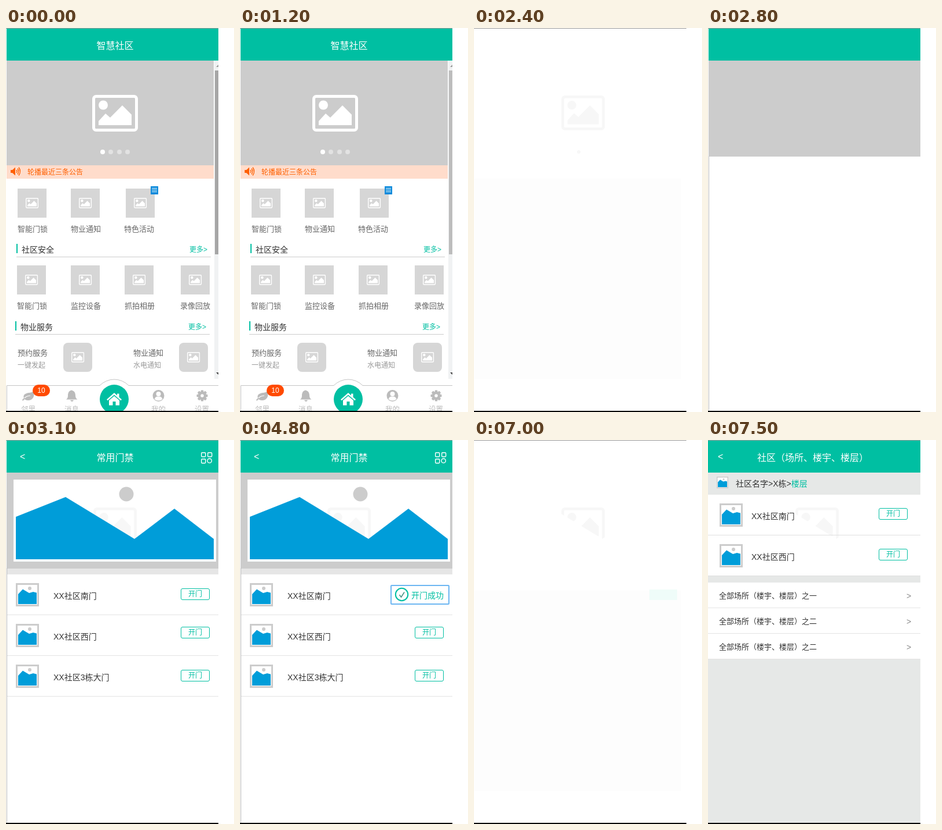
An HTML page that plays this animation: 394x660 px, repeating every 8 s.

```html
<!DOCTYPE html>
<html lang="zh-CN">
<head>
<meta charset="utf-8">
<title>智慧社区</title>
<style>
html, body { margin: 0; width: 100%; height: 100%; overflow: hidden; background: #fff; }
svg { display: block; width: 394px; height: 660px; }
text { font-family: "Liberation Sans", "Noto Sans CJK SC", "Noto Sans CJK", sans-serif; white-space: pre; }
</style>
</head>
<body>
<svg id="stage" viewBox="0 0 394 660" xmlns="http://www.w3.org/2000/svg"></svg>
<script>
const TEAL = '#00bfa2', BLUE = '#009dd9', GREY = '#ccc', TAB = '#bbb', LOOP = 8000;

const box = (x, y, w, h, fill, more = '') =>
  `<rect x="${x}" y="${y}" width="${w}" height="${h}" fill="${fill}" ${more}/>`;
const dot = (x, y, r, fill, more = '') =>
  `<circle cx="${x}" cy="${y}" r="${r}" fill="${fill}" ${more}/>`;
const path = (d, fill, more = '') => `<path d="${d}" fill="${fill}" ${more}/>`;
const line = (d, color, w = 1) => path(d, 'none', `stroke="${color}" stroke-width="${w}"`);
// y is the vertical middle of the characters
const label = (s, x, y, size, fill, anchor = 'start') =>
  `<text x="${x}" y="${y + size * 0.37}" font-size="${size}" fill="${fill}" text-anchor="${anchor}">${s}</text>`;
const group = (id, body, more = '') => `<g id="${id}" ${more}>${body}</g>`;

// Placeholder picture, 79 x 63 at scale 1
const picture = (x, y, k, color) => `<g transform="translate(${x} ${y}) scale(${k})">
  ${box(2.5, 2.5, 74, 58, 'none', `rx="4" stroke="${color}" stroke-width="5"`)}
  ${dot(19, 17.5, 8, color)}${path('M11 52V45L23 32L31 39L52 18L68 34V52Z', color)}</g>`;

const tile = (x, y, r = 0) => box(x, y, 50, 50, '#d6d6d6', `rx="${r}"`) + picture(x + 14, y + 16, 0.28, '#fff');

// Framed landscape, 40 x 40 at full size
const thumb = (x, y, size = 40) => `<g transform="translate(${x} ${y}) scale(${size / 40})">
  ${box(0, 0, 40, 40, GREY)}${box(3, 3, 34, 34, '#fff')}${dot(24, 9, 3, GREY)}
  ${path('M4 19L12 10.5L23 17L30 15L36 16.5V36H4Z', BLUE)}</g>`;

const button = (x, y) => box(x + .5, y + .5, 49, 19, '#fff', `rx="2.5" stroke="${TEAL}"`) +
  label('开门', x + 25, y + 10, 12, TEAL, 'middle');

const header = x => box(x, 1, 367 - x, 55, TEAL);

const slide = (active, color) => picture(149, 115, 1, color) +
  [167, 181, 196, 210].map((x, i) => dot(x, 213, 4, i === active ? '#fff' : '#e2e2e2')).join('');

const section = (name, x, y) => box(x, y - 10, 2, 16, TEAL) +
  label(name, x + 9, y, 14, '#333') + label('更多&gt;', x + 299, y, 12, TEAL) +
  box(x, y + 12, 336, 1, GREY);

const tiles = (list, y) => list.map(([name, x, tx]) =>
  tile(x, y) + label(name, tx, y + 69, 13, '#666')).join('');

const service = (name, note, x) => label(name, x, 558, 13, '#666') +
  label(note, x, 580, 12, '#999') + tile(x + 79, 541, 8);

function gear() {
  let teeth = '';
  for (let a = 0; a < 360; a += 45)
    teeth += box(336.7, 622.5, 4.6, 5, TAB, `rx="1" transform="rotate(${a} 339 632)"`);
  return teeth + dot(339, 632, 5, 'none', `stroke="${TAB}" stroke-width="4.5"`);
}

const speaker = path('M8 244H11L16 239.5V253.5L11 249H8Z', '#ff6000') +
  line('M18 244Q20 246.5 18 249M20 241.5Q23.5 246.5 20 251.5M22 239.5Q27 246.5 22 253.5', '#ff6000', 1.4);

const tabs = line('M1.5 658V614.5H162M212 614.5H367', '#c4c4c4') +
  path('M162 614.5A35 35 0 0 1 212 614.5', '#fff', 'stroke="#c4c4c4"') +
  dot(187, 638, 25, TEAL) +
  path('M174 638.5L187 627L192 631.5V628.5H195.5V634.5L200 638.5L198.3 640.2L187 630.5L175.7 640.2Z', '#fff') +
  path('M178 640L187 632.5L196 640V648.5H189.5V642H184.5V648.5H178Z', '#fff') +
  path('M48 624C50 634 46 640 38 640C35 640 34 639 32 638L29 641L28 639L31 636C28 628 39 627 43 626.5C45 626 46 625 48 624Z', TAB) +
  line('M32 636Q36 632 42 632', '#fff', 1.2) +
  path('M113 622.5C119 624 120 628 120 632Q120 636 123.5 638.5H104Q107 636 107 632C107 628 108 624 113 622.5ZM111 639.5H117Q116 642 114 642Q112 642 111 639.5Z', TAB) +
  dot(263.5, 632, 10, TAB) + dot(263.5, 629, 4, '#fff') +
  path('M256.5 638Q258 633.5 261 633.5H266Q269 633.5 270.5 638Q267 640.5 263.5 640.5Q260 640.5 256.5 638Z', '#fff') +
  gear() +
  [['邻里', 26], ['消息', 101], ['我的', 251], ['设置', 326]].map(([s, x]) => label(s, x, 655, 12.5, TAB)).join('') +
  box(46, 613, 30, 20, '#ff4a00', 'rx="10"') + label('10', 61, 623, 12, '#fff', 'middle');

const home = header(1) + label('智慧社区', 188.5, 30, 16, '#fff', 'middle') +
  box(1, 56, 358, 180, GREY) +
  `<g clip-path="url(#banner)">${group('slideA', slide(0, '#fff'))}${group('slideB', slide(1, '#f8f8f8'))}</g>` +
  box(1, 236, 358, 23, '#ffdccb') + speaker + label('轮播最近三条公告', 37, 248, 12, '#ff6000') +
  tiles([['智能门锁', 20, 20], ['物业通知', 112, 112], ['特色活动', 207, 204]], 276) +
  box(250, 272, 13, 14, '#0a8adb') + [275, 278, 281].map(y => box(252, y, 9, 1, '#fff')).join('') +
  section('社区安全', 18, 381) +
  tiles([['智能门锁', 19, 19], ['监控设备', 112, 112], ['抓拍相册', 205, 205], ['录像回放', 302, 301]], 408) +
  section('物业服务', 16, 514) +
  service('预约服务', '一键发起', 20) + service('物业通知', '水电通知', 220) +
  box(360, 56, 7, 547, '#f0f2f3') + box(361, 73, 6, 316, '#a6a6a6', 'id="bar"') +
  path('M363 67L367 63V67Z', '#999') + path('M363 592H367V596Z', '#444') + tabs;

const ridge = '17 132L103 98L222 170L291 118L359 170';
const ghost = picture(151, 116, 0.95, '#f7f7f7');
const cutGhost = `<g clip-path="url(#aboveRidge)">${ghost}</g>`;
const haze = box(1, 259, 357, 344, '#fdfdfd');

const doorFrame = header(1) + box(1, 56, 366, 165, GREY) + box(1, 220, 1, 438, '#bbb');

const doors = label('&lt;', 24, 28, 16, '#fff') + label('常用门禁', 188.5, 30, 16, '#fff', 'middle') +
  `<g stroke="#fff" stroke-width="1.4">${[[337, 21], [348, 21], [337, 32]].map(([x, y]) =>
    box(x + .7, y + .7, 7, 7, 'none', 'rx="1.2"')).join('')}${dot(351.7, 35.7, 3.7, 'none')}</g>` +
  box(13, 68, 350, 141, '#fff') + ghost + dot(208, 93, 12.5, GREY) +
  path(`M${ridge}V205H17Z`, BLUE) + box(2, 221, 365, 10, '#e6e6e6') +
  [['XX社区南门', 255], ['XX社区西门', 321], ['XX社区3栋大门', 395]].map(([s, by], i) =>
    thumb(17, 246 + 70 * i) + label(s, 82, 268 + 70 * i, 14, '#333') +
    button(302, by) + box(2, 300 + 70 * i, 365, 1, '#e4e4e4')).join('');

const toast = box(261, 250, 100, 32, '#fff', 'rx="1" stroke="#6db6f2" stroke-width="2"') +
  dot(279.5, 265.5, 10.7, '#fff', `stroke="${TEAL}" stroke-width="2"`) +
  line('M275.5 266L278.5 270L284 261.5', '#4d9487', 1.6) + label('开门成功', 296, 267, 14, TEAL);

const place = box(0, 56, 367, 602, '#e6e8e7') + header(0) +
  label('&lt;', 17, 28, 16, '#fff') + label('社区（场所、楼宇、楼层）', 85, 30, 16, '#fff') +
  thumb(15, 63, 20) +
  label(`社区名字&gt;X栋&gt;<tspan fill="${TEAL}">楼层</tspan>`, 48, 75, 14, '#333') +
  box(0, 94, 367, 139, '#fff') + cutGhost +
  ['南', '西'].map((s, i) => thumb(20, 109 + 70 * i) + label(`XX社区${s}门`, 75, 131 + 70 * i, 14, '#333') +
    button(295, 117 + 70 * i) + box(0, 163 + 70 * i, 367, 1, '#e0e0e0')).join('') +
  ['一', '二', '二'].map((s, i) => box(0, 245 + 44 * i, 367, 43, '#fff') +
    label(`全部场所（楼宇、楼层）之${s}`, 19, 267 + 44 * i, 13, '#333') +
    label('&gt;', 343, 268 + 44 * i, 14, '#888') + box(0, 288 + 44 * i, 367, 1, '#e4e4e4')).join('');

const fadeOut = haze + cutGhost + box(303, 257, 48, 18, '#effcf9');

document.getElementById('stage').innerHTML =
  `<defs><clipPath id="banner">${box(1, 56, 358, 180, '#000')}</clipPath>
  <clipPath id="aboveRidge"><path d="M${ridge}V60H17Z"/></clipPath></defs>` +
  group('home', home) + group('blank', haze + ghost + dot(181, 213, 3, '#f7f7f7')) +
  group('doorFrame', doorFrame) + group('doors', doors) + group('toast', toast) +
  group('fadeOut', fadeOut) + group('place', place) +
  box(0, 0, 367, 1, '#999') + box(0, 658, 367, 2, '#000');

const spans = {
  home: [0, 2400], blank: [2400, 2800], doorFrame: [2800, 7000], doors: [3100, 7000],
  toast: [4700, 6600], fadeOut: [7000, 7500], place: [7500, LOOP]
};
const parts = {};
for (const id of [...Object.keys(spans), 'slideA', 'slideB', 'bar']) parts[id] = document.getElementById(id);

function draw(t) {
  for (const id in spans)
    parts[id].style.display = t >= spans[id][0] && t < spans[id][1] ? '' : 'none';
  const step = Math.max(0, Math.min(6, Math.floor((t - 1200) / 100) + 1));
  const shift = 358 * (0.5 - Math.cos(Math.PI * step / 6) / 2);
  parts.slideA.setAttribute('transform', `translate(${-shift} 0)`);
  parts.slideB.setAttribute('transform', `translate(${358 - shift} 0)`);
  parts.bar.setAttribute('fill', t < 700 ? '#a6a6a6' : '#bdbdbd');
  parts.toast.style.opacity = t < 4800 ? 0.5 : 1;
}

const start = performance.now();
function tick() {
  draw((performance.now() - start) % LOOP);
  requestAnimationFrame(tick);
}
tick();
</script>
</body>
</html>
```
